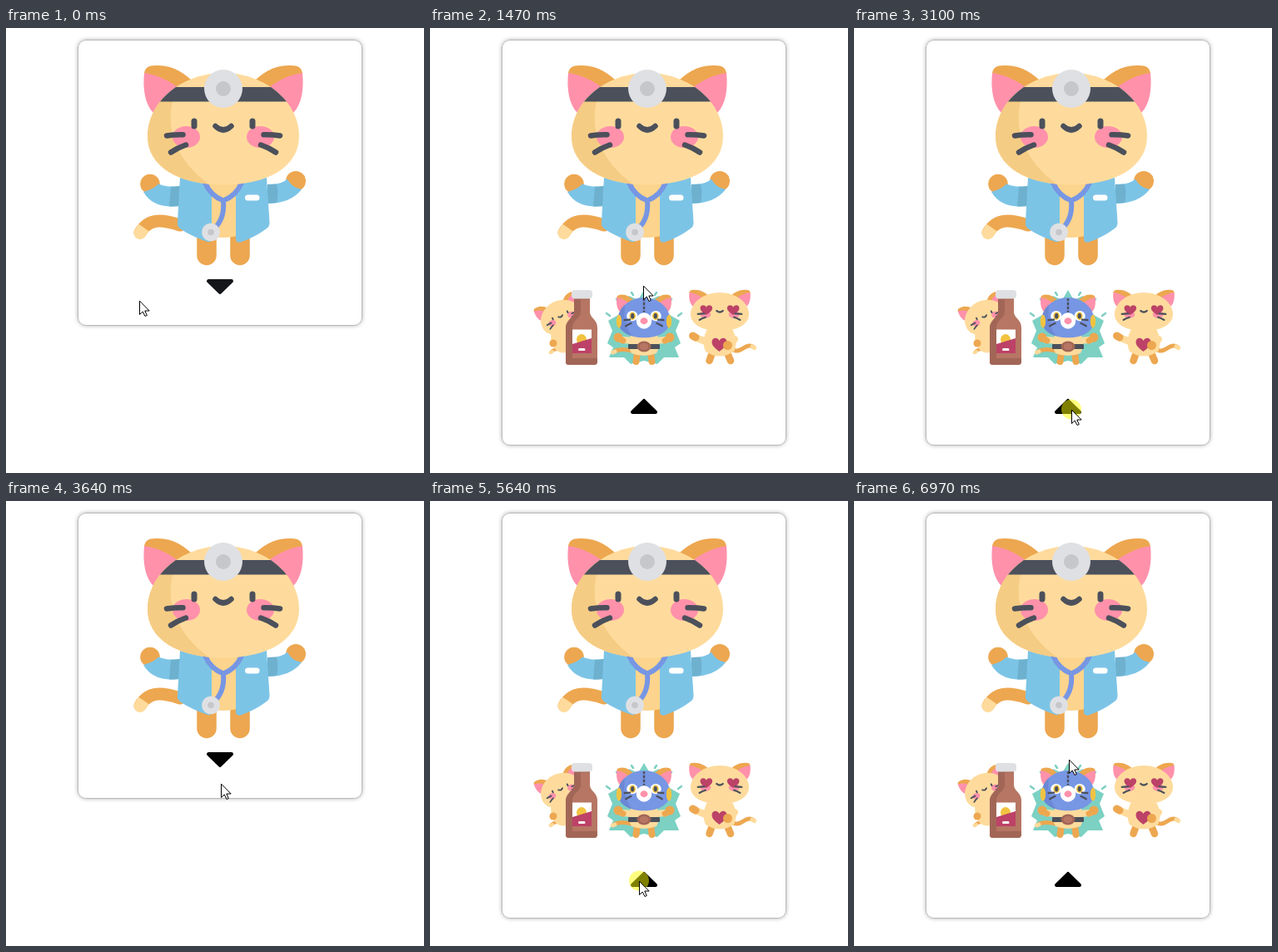
An HTML page with a canvas for the animation above (7820 ms loop, 502 by 535 pixels).

```html
<!DOCTYPE html>
<html lang="en">
<head>
<meta charset="utf-8">
<title>Cat card</title>
<style>
html, body { margin: 0; width: 100%; height: 100%; overflow: hidden; background: #fff; }
canvas { display: block; width: 502px; height: 535px; }
</style>
</head>
<body>
<canvas id="stage"></canvas>
<script>
const W = 502, H = 535, LOOP = 7820;
const canvas = document.getElementById('stage');
const ratio = window.devicePixelRatio || 1;
canvas.width = W * ratio;
canvas.height = H * ratio;
const ctx = canvas.getContext('2d');

const C = {
  fur: '#fedb9c', shade: '#f5cc84', belly: '#fcd48d', orange: '#eda750', pink: '#ff91ab',
  dark: '#4b505b', coat: '#7cc4e6', coatDark: '#6eb1cf', blue: '#7796e3', blueDark: '#6b88d5',
  grey: '#dfe0e3', greyDark: '#c6c7ca', teal: '#7cd1c3', wine: '#bc4267', yellow: '#f2c341',
  brown: '#b67663', brownDark: '#a26657'
};

// ---------- drawing helpers ----------
function fill(d, color) {
  ctx.fillStyle = color;
  ctx.fill(new Path2D(d));
}
function line(d, width, color, cap = 'round') {
  ctx.strokeStyle = color;
  ctx.lineWidth = width;
  ctx.lineCap = cap;
  ctx.lineJoin = 'round';
  ctx.stroke(new Path2D(d));
}
function oval(x, y, rx, ry, color) {
  ctx.fillStyle = color;
  ctx.beginPath();
  ctx.ellipse(x, y, rx, ry, 0, 0, Math.PI * 2);
  ctx.fill();
}
const dot = (x, y, r, color) => oval(x, y, r, r, color);
function box(x, y, w, h, r, color) {
  ctx.fillStyle = color;
  ctx.beginPath();
  ctx.roundRect(x, y, w, h, r);
  ctx.fill();
}
function heart(x, y, s, color) {
  ctx.save();
  ctx.translate(x, y);
  ctx.scale(s, s);
  fill('M0 8 C-5 4 -9 1 -9 -3.5 C-9 -9 -2.5 -10 0 -5 C2.5 -10 9 -9 9 -3.5 C9 1 5 4 0 8Z', color);
  ctx.restore();
}
function flip(axis, draw) {
  draw();
  ctx.save();
  ctx.translate(axis * 2, 0);
  ctx.scale(-1, 1);
  draw();
  ctx.restore();
}

// ---------- cats ----------
const HEAD = 'M261 54 C310 54 352 88 352 130 C352 167 314 188.500 261 188.500 C208 188.500 170 167 170 130 C170 88 212 54 261 54Z';

function ear() {
  fill('M166 56 C166 48 171 45 180 45 C200 44 215 54 227 67 L200 84Z', C.orange);
  fill('M166 54 C181 56 196 63 207 72 L177 102 C167 92 164 74 166 54Z', C.pink);
}
function head(look) {
  const mask = look === 'mask';
  flip(261, ear);
  fill(HEAD, mask ? C.blue : C.fur);
  ctx.save();
  ctx.clip(new Path2D(HEAD));
  if (look === 'doctor') {
    fill('M160 50 H222 C185 88 188 150 247 190 H160Z', C.shade);
    box(165, 71, 192, 17.500, 0, C.dark);
  }
  if (mask) fill('M160 50 H205 C185 90 188 150 225 190 H160Z', C.blueDark);
  ctx.restore();
  if (mask) {
    line('M261 58 V104', 7, C.dark, 'butt');
    line('M255 68 H267 M255 82 H267 M255 96 H267', 4, C.blue, 'butt');
    dot(261, 132, 27, '#fff');
    oval(261, 133, 13, 11, C.pink);
  }
  flip(261, () => {
    if (mask) {
      oval(220, 116, 19, 17, '#fff');
      oval(221, 116, 11, 13, C.yellow);
      oval(221, 116, 6, 9, C.dark);
      oval(174, 134, 9, 22, C.yellow);
    } else {
      oval(216.500, 131, 16.500, 13, C.pink);
      if (look === 'love') heart(219, 116, 2.1, C.wine);
      else line('M226 112 V118', 7, C.dark);
    }
    line('M193 129.500 Q202 128 212.500 128.200 M198 149.500 Q206 144 216 140.500', 6.5, C.dark);
  });
  if (!mask) line('M251.500 118 Q261 127 270.500 118', 6.5, C.dark);
  if (look === 'doctor') {
    dot(261, 73, 23, C.grey);
    dot(261, 73, 9, C.greyDark);
  }
}
function placedHead(x, y, sx, sy, turn, look) {
  ctx.save();
  ctx.translate(x, y);
  ctx.rotate(turn);
  ctx.scale(sx, sy);
  ctx.translate(-261, -121);
  head(look);
  ctx.restore();
}

function doctor() {
  line('M209 237 C190 231 172 227 161 246', 15, C.orange);
  line('M165.500 240 L161 246.500', 15, C.fur, 'butt');
  dot(161, 246.500, 7.5, C.fur);
  line('M241 248 V273.500 M281 248 V273.500', 23.5, C.orange);

  dot(173, 187.500, 11.800, C.orange);
  fill('M165 197 Q177 194 183 187.500 Q193 192 209 190 V214 Q177 218 165 197Z', C.coat);
  fill('M198 191 L209 190 V214 L196 214.500Z', C.coatDark);
  dot(348, 184, 12, C.orange);
  fill('M338 181.500 Q343 192 355 194 Q342 211 314 211 V188 Q330 189 338 181.500Z', C.coat);
  fill('M314 188 L325 187.500 Q328 200 325 210 L314 211Z', C.coatDark);

  fill('M232 180 H292 L278 250 Q261 254 245 250Z', C.belly);
  fill('M209 180 L206 233 Q205 239 210 242 Q224 251 242 257 Q247 258 247 253 V197 L237 184Z', C.coat);
  fill('M313 180 L316.500 233 Q317 238 313 241 Q300 251 282 257.500 Q276 259 276 253 V197 L285 184Z', C.coat);
  line('M239 186 Q246 202 261 207.500 Q276 202 283 186 M261 207.500 Q263 230 249 242', 6, C.blue);
  dot(246, 245.500, 10.800, C.grey);
  dot(246, 245.500, 3.8, C.greyDark);
  box(287, 200.500, 17.500, 7, 3.5, '#fff');
  head('doctor');
}

function bottleCat() {
  line('M160 387 Q150 384 145 390', 4, C.orange);
  line('M147 389 L144.500 390', 4, C.fur);
  fill('M148 360 Q141 372 151 387 Q158 393 168 389 V355Z', C.fur);
  line('M164 382 L150 379', 8, C.fur);
  dot(148, 379, 4.5, C.orange);
  placedHead(157, 347, 0.28, 0.29, -0.43, 'plain');

  const glass = 'M173 322 H192 V341 C192 349 201 350 201 360 V401 Q201 405 197 405 H167 Q163 405 163 401 V360 C163 350 173 349 173 341Z';
  fill(glass, C.brown);
  ctx.save();
  ctx.clip(new Path2D(glass));
  fill('M173 322 H181 V341 C181 350 171 350 171 361 V405 H163 V358 L173 342Z', C.brownDark);
  box(163, 397, 38, 8, 0, C.brownDark);
  ctx.restore();
  box(173, 324, 19, 2.5, 0, C.brownDark);
  box(170, 315, 25, 10.500, 4, C.grey);
  box(171, 362.500, 23, 28.500, 0, '#fff');
  oval(182, 374.500, 6, 6.5, C.yellow);
  fill('M171 380 L194 373 V391 H171Z', C.wine);
  box(178, 385, 8.500, 3, 1.500, '#fff');
}

function wrestler() {
  flip(257, () => {
    fill('M257 315 L250 327 L239 322 L235 337 L226 345 L214 352 L219 364 L213 379 L220 384 L215 396 L233 396 L241 404 L257 400Z', C.teal);
    line('M242 318 L244 321 M224 326 L228 329 M212 343 L216 346', 2.5, C.teal);
  });
  line('M245 389 Q230 384 221 389', 5, C.orange);
  line('M222 389 L219.500 390', 5, C.fur);
  flip(257, () => {
    line('M249 390 L247.500 401', 8, C.orange);
    line('M244 376 L231 375', 8, C.fur);
    dot(226, 372, 5.500, C.orange);
    line('M228 374 L232 376', 7, C.orange);
  });
  fill('M242 367 Q236 382 242 391 Q257 397 272 391 Q278 382 272 367Z', C.fur);
  box(238, 380, 38, 6, 1, C.dark);
  oval(257, 383, 8.500, 6.500, C.brownDark);
  oval(257, 383, 5.500, 4, C.brown);
  placedHead(257, 348, 0.345, 0.36, 0, 'mask');
}

function lover() {
  line('M364 387 C374 392 379 377 389 384', 5, C.orange);
  line('M387 383 L389.500 384.500', 5, C.fur);
  line('M338 393 L335.500 400 M358 393 L361 400', 8.500, C.orange);
  line('M334 378 L321 373', 8.500, C.fur);
  line('M319 372 L315.500 370', 9, C.orange);
  fill('M334 360 Q325 376 331 389 Q348 400 365 389 Q371 376 362 360Z', C.fur);
  heart(347.500, 381, 1, C.wine);
  line('M366 374 L362 380', 8, C.fur);
  dot(357.500, 381.500, 5.500, C.orange);
  placedHead(348, 341, 0.385, 0.345, 0, 'love');
}

// ---------- interface ----------
function card(open) {
  const h = open ? 487 : 343;
  ctx.save();
  ctx.shadowColor = 'rgba(0,0,0,.3)';
  ctx.shadowBlur = 5 * ratio;
  box(86, 14, 342, h + 1, 10, '#fff');
  ctx.restore();
  ctx.strokeStyle = '#b9b9b9';
  ctx.lineWidth = 1;
  ctx.beginPath();
  ctx.roundRect(86.500, 14.500, 341, h, 9.5);
  ctx.stroke();
}
function caret(open, color) {
  const d = open ? 'M243.200 461.800 H270.800 L257 448.200Z' : 'M243.200 304.200 H270.800 L257 317.800Z';
  fill(d, color);
  line(d, 4.4, color);
}
function pointer(x, y) {
  ctx.save();
  ctx.translate(x + 0.5, y + 0.5);
  const d = 'M0 0 V16 L3.700 12.500 L6.500 18 L8.800 17 L6.300 11.500 H11.300Z';
  fill(d, '#fff');
  line(d, 1, '#000');
  ctx.restore();
}

// ---------- timeline ----------
// start, last step, step count, end point, optional curve control
const moves = [
  [210, 910, 10, [266, 319], [215, 122]],
  [1140, 1140, 1, [263, 313]],
  [1290, 1290, 1, [256, 310]],
  [2230, 2610, 6, [272, 459], [242, 390]],
  [2780, 2850, 2, [261, 459]],
  [3170, 3800, 10, [257, 307]],
  [4440, 4950, 8, [253, 466]],
  [5100, 5260, 3, [251, 457]],
  [5720, 6330, 9, [258, 311]]
];
// highlight on, panel toggles
const clicks = [[1380, 1470], [3100, 3170], [4180, 4260], [5640, 5720], [6800, 6970]];

const ease = u => u * u * (3 - 2 * u);

function pointerAt(t) {
  let from = [160, 328];
  for (const [start, end, n, to, bend] of moves) {
    if (t < start) break;
    if (t < end) {
      const step = Math.floor((t - start) / (end - start) * (n - 1)) + 1;
      const u = ease(step / n);
      return from.map((a, i) => {
        const mid = bend ? bend[i] : (a + to[i]) / 2;
        return Math.round((1 - u) ** 2 * a + 2 * u * (1 - u) * mid + u * u * to[i]);
      });
    }
    from = to;
  }
  return from;
}

function render(t) {
  const open = clicks.filter(c => t >= c[1]).length % 2 === 1;
  const pressed = clicks.some(c => t >= c[0] && t < c[1]);
  const [x, y] = pointerAt(t);
  ctx.setTransform(ratio, 0, 0, ratio, 0, 0);
  ctx.fillStyle = '#fff';
  ctx.fillRect(0, 0, W, H);
  card(open);
  doctor();
  if (open) {
    bottleCat();
    wrestler();
    lover();
  }
  caret(open, t < 830 ? '#14161a' : '#000');
  if (pressed) dot(x, y - 0.5, 12, 'rgba(255,255,0,.5)');
  pointer(x, y);
}

const began = performance.now();
function tick() {
  render((performance.now() - began) % LOOP);
  requestAnimationFrame(tick);
}
tick();
</script>
</body>
</html>
```
